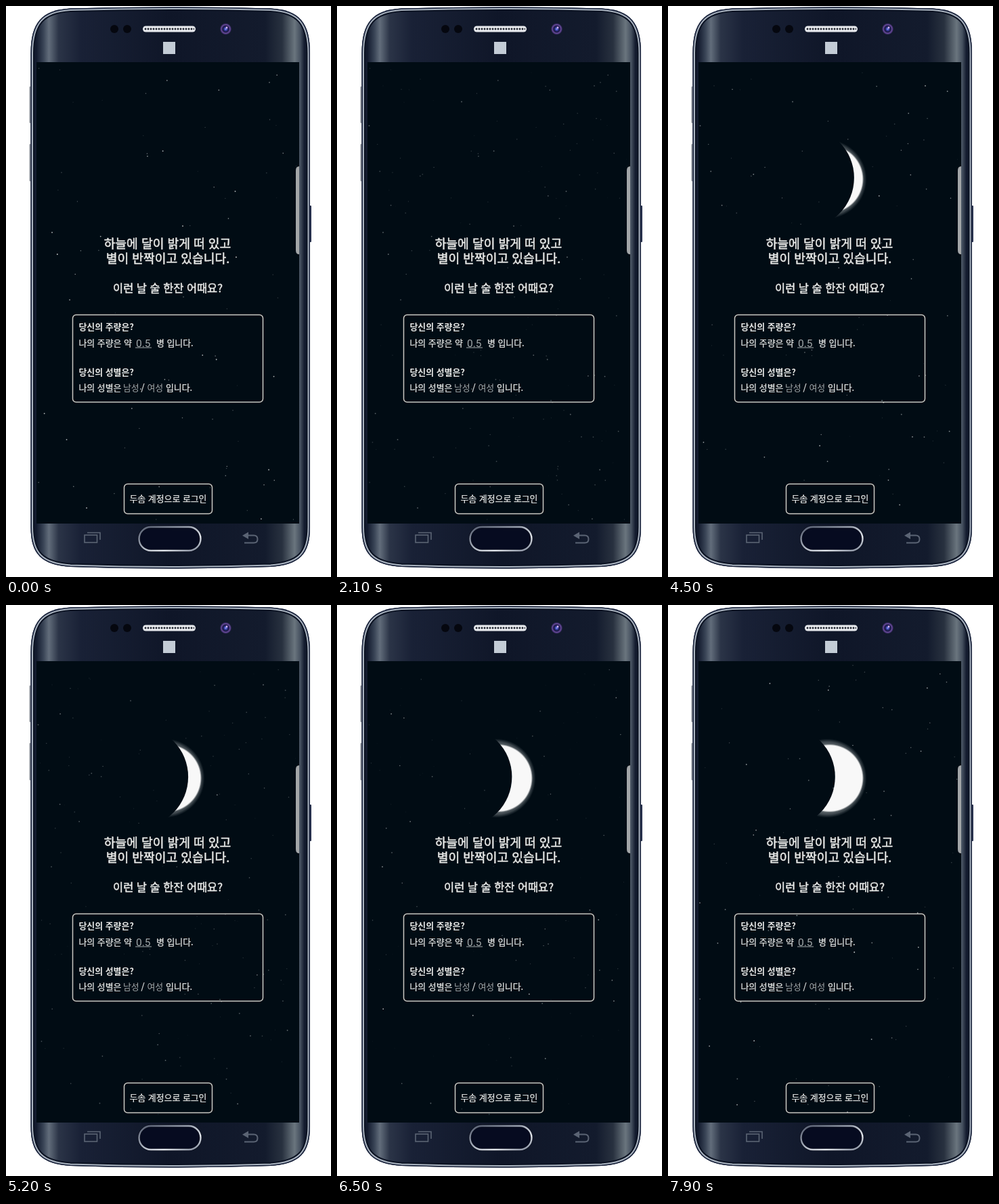
Animation of 480x844 px, one loop 8 s. Source, as an HTML page:

```html
<!DOCTYPE html>
<html lang="ko">
<head>
<meta charset="utf-8">
<title>Moonlight login</title>
<style>
  html, body { margin: 0; width: 100%; height: 100%; overflow: hidden; background: #fff; }
  svg { display: block; width: 100vw; height: 100vh; }
  text { font-family: "Noto Sans CJK KR", "Noto Sans CJK JP", "Noto Sans CJK", sans-serif; fill: #e8e8e6; stroke: #e8e8e6; stroke-width: .25; }
  .title { font-size: 18.2px; }
  .ask { font-size: 16.4px; }
  .title, .ask { text-anchor: middle; stroke-width: .55; }
  .small { font-size: 12.9px; }
  .bold { font-weight: 700; stroke: none; }
  .dim { fill: #a4a8aa; stroke: none; }
  .amount { font: 15.5px Roboto, sans-serif; }
  .frame { fill: none; stroke: #cbc8c2; stroke-width: 1.5; }

  .screen { animation: nudge 8s step-end infinite; }
  @keyframes nudge { 0% { transform: none; } 11.25% { transform: translateX(4px); } 21.25% { transform: none; } }

  .shade { animation: wax 8s steps(80) infinite; }
  @keyframes wax { from { transform: translateX(237px); } to { transform: translateX(171px); } }
  .disc { animation: rise 8s steps(10) infinite; }
  @keyframes rise { 0%, 32.5% { opacity: 0; } 42.5% { opacity: .12; } 55%, 100% { opacity: 1; } }
  .glow { animation: halo 8s steps(10) infinite; }
  @keyframes halo { 0%, 27.5% { opacity: 0; } 42.5% { opacity: .6; } 55%, 100% { opacity: 1; } }

  /* Four skies follow one another; each star also shimmers. */
  .stars g { animation: 8s steps(8) infinite; }
  .early { animation-name: early !important; }
  .rising { animation-name: rising !important; }
  .calm { animation-name: calm !important; }
  .late { animation-name: late !important; }
  @keyframes early { 0%, 20% { opacity: 1; } 32%, 100% { opacity: 0; } }
  @keyframes rising { 0%, 20% { opacity: 0; } 32%, 58% { opacity: 1; } 70% { opacity: .2; } 90%, 100% { opacity: 0; } }
  @keyframes calm { 0%, 58% { opacity: 0; } 70%, 83% { opacity: 1; } 95%, 100% { opacity: 0; } }
  @keyframes late { 0%, 83% { opacity: 0; } 96%, 100% { opacity: 1; } }
  .twinkle { animation: twinkle 2s steps(10) infinite alternate; }
  @keyframes twinkle { from { opacity: 1; } to { opacity: .45; } }
</style>
</head>
<body>
<svg viewBox="0 0 480 844" preserveAspectRatio="none">
  <defs>
    <path id="body" d="M36.500 70C36.500 24 53 6 95 3.500Q243 -.5 391 3.500C433 6 449 24 449 70V770C449 811 433 826 391 829Q243 834 95 829C53 826 36.500 811 36.500 770Z"/>
    <linearGradient id="metal" x1="0" x2="1" y1="0" y2="0">
      <stop offset=".02" stop-color="#131b2e"/><stop offset=".045" stop-color="#384355"/>
      <stop offset=".065" stop-color="#626d7b"/><stop offset=".1" stop-color="#2b3447"/>
      <stop offset=".18" stop-color="#192136"/><stop offset=".5" stop-color="#0f1628"/>
      <stop offset=".84" stop-color="#131b2d"/><stop offset=".9" stop-color="#28313f"/>
      <stop offset=".945" stop-color="#6a757e"/><stop offset=".965" stop-color="#465160"/>
      <stop offset=".98" stop-color="#131b2e"/>
    </linearGradient>
    <linearGradient id="ring" x1="0" x2="1" y1="0" y2="1">
      <stop offset="0" stop-color="#555d70"/><stop offset=".4" stop-color="#9ba3b1"/>
      <stop offset=".7" stop-color="#e2e6ec"/><stop offset="1" stop-color="#7b8496"/>
    </linearGradient>
    <radialGradient id="lens">
      <stop offset="0" stop-color="#8fa4ff"/><stop offset=".25" stop-color="#3a3fa8"/>
      <stop offset=".5" stop-color="#14143c"/><stop offset=".75" stop-color="#6a4a9c"/>
      <stop offset="1" stop-color="#1a1c3c"/>
    </radialGradient>
    <radialGradient id="haze">
      <stop offset=".8" stop-color="#a2a8ab" stop-opacity=".75"/>
      <stop offset=".92" stop-color="#8d9498" stop-opacity=".42"/>
      <stop offset="1" stop-color="#7d868a" stop-opacity="0"/>
    </radialGradient>
    <radialGradient id="white">
      <stop offset=".955" stop-color="#f8f8f8"/>
      <stop offset="1" stop-color="#f8f8f8" stop-opacity="0"/>
    </radialGradient>
    <pattern id="holes" x="204" y="31" width="4" height="6" patternUnits="userSpaceOnUse">
      <circle cx="2" cy="3" r="1.4" fill="#20242e"/>
    </pattern>
    <filter id="soft"><feGaussianBlur stdDeviation=".6"/></filter>
    <clipPath id="edge"><use href="#body"/></clipPath>
    <clipPath id="glass"><rect x="45" y="83" width="388" height="682"/></clipPath>
    <mask id="phase" maskUnits="userSpaceOnUse" x="165" y="185" width="145" height="145">
      <rect x="165" y="185" width="145" height="145" fill="#fff"/>
      <circle class="shade" cy="254" r="75" fill="#000" filter="url(#soft)"/>
    </mask>
  </defs>

  <!-- phone -->
  <g fill="#8b8f98">
    <rect x="34.5" y="119" width="3" height="54" rx="1"/>
    <rect x="34.5" y="204" width="3" height="55" rx="1"/>
    <rect x="448" y="295" width="3" height="54" rx="1" fill="#2a3350"/>
  </g>
  <g clip-path="url(#edge)">
    <use href="#body" fill="url(#metal)"/>
    <g fill="none">
      <use href="#body" stroke="#0b1222" stroke-width="11"/>
      <use href="#body" stroke="#a9b3bf" stroke-width="7"/>
      <use href="#body" stroke="#18213a" stroke-width="3"/>
    </g>
  </g>
  <circle cx="160" cy="34" r="6" fill="#05070f"/>
  <circle cx="179" cy="34" r="6" fill="#05070f"/>
  <rect x="202" y="29.5" width="78" height="9" rx="4.5" fill="#e6e8ec"/>
  <rect x="204" y="31" width="74" height="6" rx="3" fill="url(#holes)"/>
  <circle cx="324.5" cy="34" r="8.5" fill="url(#lens)"/>
  <circle cx="326" cy="32" r="1.4" fill="#d9b4f0"/>
  <rect x="232" y="53" width="18" height="18" fill="#c3ccd6"/>
  <rect x="196.5" y="770" width="91" height="35" rx="17.5" fill="#060b20" stroke="#0a0e1c" stroke-width="4"/>
  <rect x="196.5" y="770" width="91" height="35" rx="17.5" fill="none" stroke="url(#ring)" stroke-width="2.4"/>
  <g fill="none" stroke="#5b6474" stroke-width="1.6">
    <rect x="116" y="782" width="18.5" height="11"/>
    <path d="M120 778.5H139V789"/>
    <path d="M357 782.5H366Q371.5 782.5 371.5 788T366 793.5H352" stroke-width="2"/>
    <path d="M358 777.5V788L349 782.7Z" fill="#5b6474" stroke="none"/>
  </g>

  <!-- app -->
  <g class="screen">
    <g clip-path="url(#glass)">
      <rect x="45" y="83" width="388" height="682" fill="#010c14"/>
      <g class="stars" id="stars"></g>
      <g mask="url(#phase)">
        <circle class="glow" cx="235" cy="256" r="58.5" fill="url(#haze)"/>
        <circle class="disc" cx="238.5" cy="256" r="50.5" fill="url(#white)"/>
      </g>
      <path d="M433 237Q428 237 428 243V361Q428 367 433 367Z" fill="#a3a6a8"/>
    </g>
    <text class="title" x="238.5" y="358">하늘에 달이 밝게 떠 있고</text>
    <text class="title" x="239" y="380">별이 반짝이고 있습니다.</text>
    <text class="ask" x="239" y="422.5">이런 날 술 한잔 어때요?</text>
    <rect class="frame" x="98.5" y="456.5" width="281" height="129" rx="5"/>
    <g class="small">
      <text class="bold" x="107.5" y="479">당신의 주량은?</text>
      <text x="107.5" y="502.5">나의 주량은 약<tspan class="dim amount" x="192" y="503.5">0.5</tspan><tspan x="222" y="502.5">병 입니다.</tspan></text>
      <path d="M191 505H215" stroke="#a4a8aa"/>
      <text class="bold" x="107.5" y="545.5">당신의 성별은?</text>
      <text x="107.5" y="568.5">나의 성별은<tspan class="dim" x="173">남성</tspan><tspan x="199.5">/</tspan><tspan class="dim" x="208.5">여성</tspan><tspan x="236">입니다.</tspan></text>
      <text x="239.5" y="733" text-anchor="middle">두솜 계정으로 로그인</text>
    </g>
    <rect class="frame" x="174.5" y="706.5" width="130" height="44" rx="5"/>
  </g>
</svg>
<script>
  const skies = { early: 85, rising: 95, calm: 70, late: 95 };
  const root = document.getElementById('stars');

  let seed = 7;
  const rand = (min, max) => {
    seed = seed * 16807 % 2147483647;
    return min + (max - min) * seed / 2147483647;
  };
  const add = (parent, tag, attrs) => {
    const el = document.createElementNS('http://www.w3.org/2000/svg', tag);
    for (const key in attrs) el.setAttribute(key, attrs[key]);
    return parent.appendChild(el);
  };

  for (const [name, count] of Object.entries(skies)) {
    const sky = add(root, 'g', { class: name });
    for (let i = 0; i < count; i++) {
      const glint = rand(0, 1);
      const star = add(sky, 'circle', {
        cx: rand(47, 430), cy: rand(88, 763), r: .55 + glint * .4,
        fill: '#d4d8d8', 'fill-opacity': .15 + glint * .75
      });
      // The opening sky holds still.
      if (name === 'early') continue;
      star.setAttribute('class', 'twinkle');
      star.style.animationDelay = -Math.floor(rand(0, 40)) / 10 + 's';
    }
  }
</script>
</body>
</html>
```
